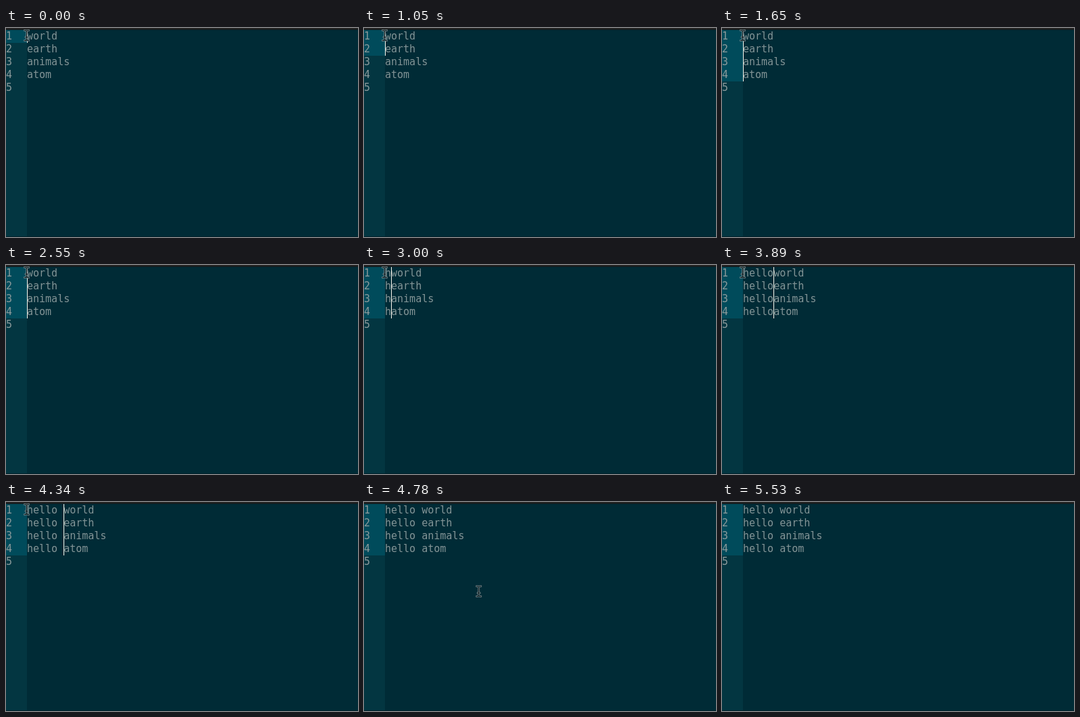
Write an HTML page with a canvas that moves like this. It is 520x309 px and loops after 6.6 s.

```html
<!DOCTYPE html>
<html lang="en">
<head>
<meta charset="utf-8">
<title>Multi-line typing</title>
<style>
html, body { margin: 0; width: 520px; height: 309px; overflow: hidden; background: #002b36; }
canvas { display: block; }
</style>
</head>
<body>
<canvas id="stage" width="520" height="309"></canvas>
<script>
const ctx = document.getElementById('stage').getContext('2d');
const LOOP = 6600, TOP = 3, ROW = 19, GUTTER = 31, CHAR = 9;
const words = ['world', 'earth', 'animals', 'atom'];
const prefix = 'hello ';

const rowTimes = [0, 1050, 1350, 1650];
const keyTimes = [3000, 3140, 3440, 3590, 3890, 4340];
const caretToggles = [0, 450, 900, 2250, 2550, 4780, 5230, 5530];
const pointerStops = [[0, 26, 2], [4780, 165, 123], [4930, 389, 283]];
const POINTER_END = 5080;

const passed = (times, t) => times.filter(x => x <= t).length;

function box(color, x, y, w, h) {
  ctx.fillStyle = color;
  ctx.fillRect(x, y, w, h);
}

function drawText(text, x, row) {
  ctx.fillText(text, x, TOP + row * ROW + 14);
}

function drawPointer(x, y) {
  ctx.save();
  ctx.translate(x, y);
  const shape = new Path2D(
    'M1.5 1.5 H2.5 Q4.5 1.5 4.5 3.5 Q4.5 1.5 6.5 1.5 H7.5 ' +
    'M4.5 3.5 V14.5 M3 11.5 H6 ' +
    'M1.5 16.5 H2.5 Q4.5 16.5 4.5 14.5 Q4.5 16.5 6.5 16.5 H7.5');
  ctx.lineCap = 'square';
  ctx.lineJoin = 'round';
  ctx.strokeStyle = '#829093';
  ctx.lineWidth = 2.5;
  ctx.stroke(shape);
  ctx.strokeStyle = '#0b1c21';
  ctx.lineWidth = 1.1;
  ctx.stroke(shape);
  ctx.restore();
}

function draw(t) {
  const rows = passed(rowTimes, t);
  const typed = prefix.slice(0, passed(keyTimes, t));

  box('#002b36', 0, 0, 520, 309);
  box('#033641', 0, TOP, GUTTER, 309 - TOP);
  box('#004b5b', 0, TOP, GUTTER, rows * ROW);
  box('#222222', 0, 0, 520, 2);
  box('#0b1a1e', 0, 2, 520, 1);
  box('#01212a', 0, 308, 520, 1);

  ctx.font = '15px "DejaVu Sans Mono", monospace';
  ctx.textBaseline = 'alphabetic';
  ctx.fillStyle = '#8b9a9b';
  for (let i = 0; i < 5; i++) drawText(String(i + 1), 0, i);
  ctx.fillStyle = '#839496';
  words.forEach((word, i) => drawText(typed + word, GUTTER, i));

  if (passed(caretToggles, t) % 2) {
    box('#fffaf0', GUTTER + typed.length * CHAR, TOP, 1, rows * ROW);
  }
  if (t < POINTER_END) {
    const [, x, y] = pointerStops.filter(p => p[0] <= t).pop();
    drawPointer(x, y);
  }
}

const start = performance.now();
function tick() {
  draw((performance.now() - start) % LOOP);
  requestAnimationFrame(tick);
}
tick();
</script>
</body>
</html>
```
